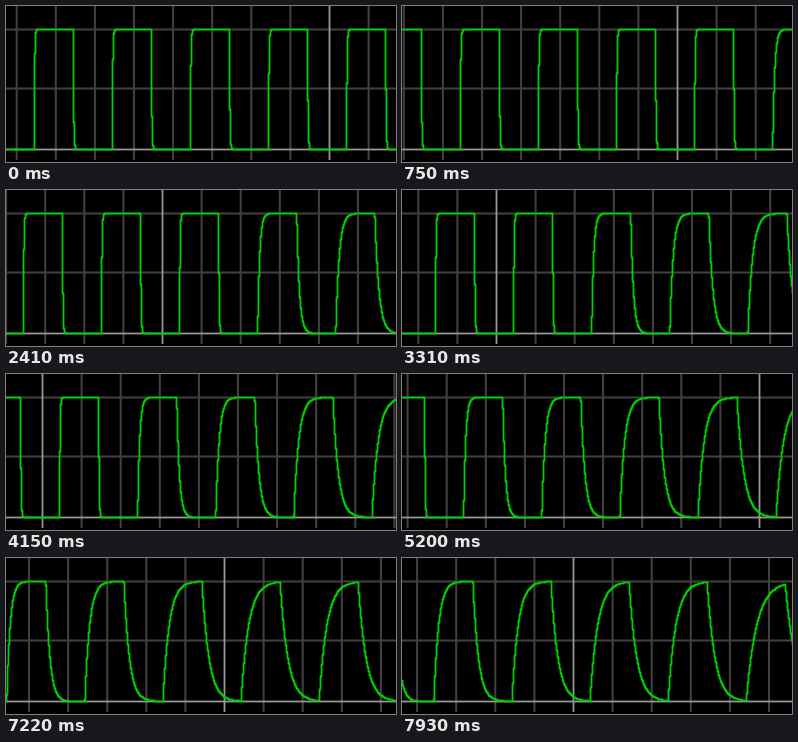
A matplotlib script that plays this animation: 390 by 156 pixels, repeating every 8 s.

```python
import numpy as np
import matplotlib.pyplot as plt
from matplotlib.animation import FuncAnimation

W, H, DPI = 390, 156, 100
LOOP, TICK = 8000, 20
PX = 72 / DPI

DIV = 39.1                   # grid spacing
PERIOD = 78.1                # one pulse
TOP, MID, BASE = 23.5, 82.5, 143.5
AXIS_X = 323.5
FIRST_RISE = 27.2

MINOR = dict(color="#404040", lw=2.1 * PX, zorder=1)
MAIN = dict(color="#989898", lw=1.8 * PX, zorder=2)
GREEN = dict(color="#00d000", lw=1.8 * PX, zorder=3)

# The picture advances in steps of uneven length, grouped by twelve.
STEP_AT = [0, 60, 820, 890, 1660, 1730, 2470, 2540, 3310, 3380, 4150,
           4230, 4990, 5060, 5830, 5900, 6660, 6730, 7510, 7580, 7930]
STEP_NO = [0] + [12 * b + e for b in range(9) for e in (1, 12)] + [109, 114]

# Scroll distance in pixels at a few steps.
SCROLL_STEP = [0, 21, 35, 60, 75, 94, 114]
SCROLL_PX = [0, 100, 167, 287, 357, 448, 543]

# Time constant in pixels against pulse number.
TAU_PULSE = [4.5, 5, 9, 10.5, 11]
TAU = [0.5, 2, 7.6, 7.8, 10.5]


def build_trace(length):
    """Charge and discharge curve, one sample per pixel."""
    u = np.arange(length)
    level = np.zeros(length)
    start = 0.0
    for half in range(26):
        a = FIRST_RISE + half * PERIOD / 2
        b = a + PERIOD / 2
        goal = 1 - half % 2
        tau = np.interp(half / 2, TAU_PULSE, TAU)
        part = (u >= a) & (u < b)
        level[part] = goal + (start - goal) * np.exp(-(u[part] - a) / tau)
        start = goal + (start - goal) * np.exp(-(b - a) / tau)
    return np.round(BASE - (BASE - TOP) * level - 0.5) + 0.5


TRACE = build_trace(980)

fig = plt.figure(figsize=(W / DPI, H / DPI), dpi=DPI, facecolor="black")
ax = fig.add_axes([0, 0, 1, 1])
ax.set_xlim(0, W)
ax.set_ylim(H, 0)
ax.axis("off")


def line(xs, ys, style, **kw):
    return ax.plot(xs, ys, solid_capstyle="butt", snap=False,
                   **style, **kw)[0]


for y in (TOP, MID):
    line([0, W], [y, y], MINOR)
line([0, W], [BASE, BASE], MAIN)

grid = [line([0, 0], [0, 154], MINOR) for _ in range(11)]
cols = np.arange(-1, W + 2)
wave = line([], [], GREEN, drawstyle="steps-post")


def draw(i):
    t = i * TICK + TICK / 2
    step = int(np.interp(t, STEP_AT, STEP_NO) + 0.01)
    shift = int(round(np.interp(step, SCROLL_STEP, SCROLL_PX)))

    first = int(np.ceil((shift - AXIS_X - 1) / DIV))
    for n, g in enumerate(grid, first):
        x = AXIS_X + n * DIV - shift
        g.set_xdata([x, x])
        g.set(**(MAIN if n % 10 == 0 else MINOR))

    idx = np.clip(cols + shift, 0, len(TRACE) - 1)
    wave.set_data(cols + 0.5, TRACE[idx])
    return [*grid, wave]


anim = FuncAnimation(fig, draw, frames=LOOP // TICK, interval=TICK,
                     repeat=True, repeat_delay=0, blit=False)
plt.show()
```
